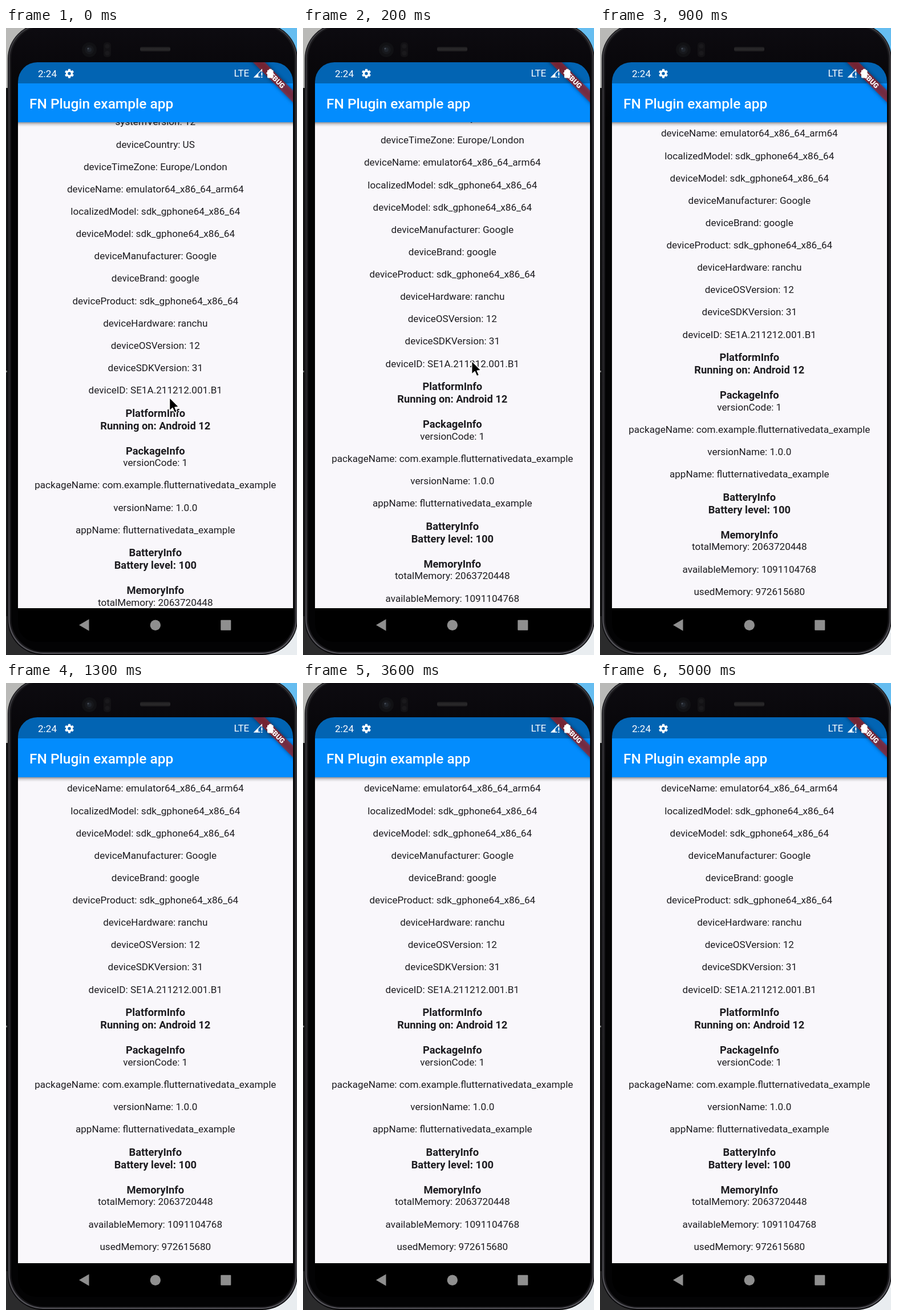
An HTML page with a canvas that plays this animation: 510 px wide and 1098 px high, repeating every 5100 ms.

```html
<!DOCTYPE html>
<html lang="en">
<head>
<meta charset="utf-8">
<title>Plugin example app</title>
<style>
html, body { margin: 0; width: 100%; height: 100%; overflow: hidden; background: #000; }
canvas { display: block; width: 510px; height: 1098px; }
</style>
</head>
<body>
<canvas id="stage"></canvas>
<script>
const W = 510, H = 1098, LOOP = 5100, STEP = 100;
const DP = 1.2232;
const SCREEN = { x: 21, y: 60, r: 503, bar: 97, body: 165, end: 1016 };
const MID = 261.8;
const FONT = 'Roboto, "Noto Sans", sans-serif';

const canvas = document.getElementById('stage');
const ratio = window.devicePixelRatio || 1;
canvas.width = W * ratio;
canvas.height = H * ratio;
const ctx = canvas.getContext('2d');

// Lines starting with '#' are bold; an empty line is a bold-height gap.
const lines = [
  'systemVersion: 12', 'deviceCountry: US', 'deviceTimeZone: Europe/London',
  'deviceName: emulator64_x86_64_arm64', 'localizedModel: sdk_gphone64_x86_64',
  'deviceModel: sdk_gphone64_x86_64', 'deviceManufacturer: Google',
  'deviceBrand: google', 'deviceProduct: sdk_gphone64_x86_64',
  'deviceHardware: ranchu', 'deviceOSVersion: 12', 'deviceSDKVersion: 31',
  'deviceID: SE1A.211212.001.B1',
  '#PlatformInfo', '#Running on: Android 12', '',
  '#PackageInfo', 'versionCode: 1',
  'packageName: com.example.flutternativedata_example',
  'versionName: 1.0.0', 'appName: flutternativedata_example',
  '#BatteryInfo', '#Battery level: 100', '',
  '#MemoryInfo', 'totalMemory: 2063720448', 'availableMemory: 1091104768',
  'usedMemory: 972615680'
];

function layout() {
  const rows = [];
  let top = 0;
  for (const line of lines) {
    const bold = line[0] === '#';
    if (line) rows.push({ text: bold ? line.slice(1) : line, bold, y: (top + (bold ? 14 : 13)) * DP });
    top += bold || !line ? 18 : 32;
  }
  return rows;
}
const rows = layout();
const LIST_TOP = 154.53;

function box(x, y, w, h, r, fill) {
  ctx.beginPath();
  ctx.roundRect(x, y, w, h, r);
  ctx.fillStyle = fill;
  ctx.fill();
}

function disc(x, y, r, fill) {
  ctx.beginPath();
  ctx.arc(x, y, r, 0, Math.PI * 2);
  ctx.fillStyle = fill;
  ctx.fill();
}

function poly(points, fill) {
  ctx.beginPath();
  points.forEach(([x, y]) => ctx.lineTo(x, y));
  ctx.closePath();
  if (fill) {
    ctx.fillStyle = fill;
    ctx.fill();
  }
}

function label(text, x, y, size, weight, color, align = 'left') {
  ctx.font = `${weight} ${size}px ${FONT}`;
  ctx.textAlign = align;
  ctx.fillStyle = color;
  ctx.fillText(text, x, y);
}

function fade(x0, y0, x1, y1, ...colors) {
  const g = ctx.createLinearGradient(x0, y0, x1, y1);
  colors.forEach((c, i) => g.addColorStop(i / (colors.length - 1), c));
  return g;
}

function drawPhone() {
  box(0, 0, W, H, 0, '#161617');
  box(0, 0, 60, 105, 0, '#b9b9b7');
  box(450, 0, 60, 60, 0, '#66bdf0');
  box(0, 1030, 60, 68, 0, '#2b2b2c');
  box(450, 1030, 60, 68, 0, '#e9edf0');

  // Metal rim, then the glass.
  box(3, -8, 508, 1106, 62, '#08080a');
  box(4, -7, 506, 1103, 61, fade(0, 0, 0, H, '#3c3b40', '#2a292d', '#28272a', '#55545a'));
  box(6.5, -5, 501, 1099, 59, '#19181b');
  box(9, -3, 496, 1095, 57, fade(0, 0, 0, 160, '#0d0b10', '#030304'));
  box(0, 600, 2, 3, 0, '#777');

  disc(146, 38, 13, '#111114');
  disc(146, 38, 8, '#17181c');
  disc(146, 38, 4, '#20242b');
  disc(144, 36, 1.5, '#454b55');
  box(171, 25, 13, 26, 5, '#131215');
  disc(177.5, 32, 4, '#1a191c');
  disc(177.5, 44, 4, '#1a191c');
  box(235, 33, 53, 8, 3, fade(0, 33, 0, 41, '#1a191b', '#2b2a2c', '#1b1a1c'));
}

function drawList(scroll) {
  const { x, r, body, end } = SCREEN;
  ctx.save();
  ctx.beginPath();
  ctx.rect(x, body, r - x, end - body);
  ctx.clip();
  box(x, body, r - x, end - body, 0, '#f9f7fb');
  for (const row of rows) {
    const y = LIST_TOP + row.y - scroll;
    if (y < body - 10 || y > end + 20) continue;
    label(row.text, MID, y, (row.bold ? 15 : 14) * DP, row.bold ? 700 : 400, '#1d1c20', 'center');
  }
  box(x, body, r - x, 8, 0, fade(0, body, 0, body + 8, 'rgba(0,0,0,.4)', 'rgba(0,0,0,.12)', 'rgba(0,0,0,0)'));
  ctx.restore();
}

function drawGear(x, y) {
  ctx.save();
  ctx.translate(x, y);
  disc(0, 0, 6, '#fff');
  for (let i = 0; i < 6; i++) {
    ctx.rotate(Math.PI / 3);
    box(-2.1, -8, 4.2, 5, 0.8, '#fff');
  }
  disc(0, 0, 2.7, '#0264b3');
  ctx.restore();
}

function drawBanner() {
  const band = fill => box(-60, 28 * DP, 120, 12 * DP, 0, fill);
  ctx.save();
  ctx.translate(502, SCREEN.y);
  ctx.rotate(Math.PI / 4);
  ctx.filter = 'blur(3px)';
  band('rgba(0,0,0,.5)');
  ctx.filter = 'none';
  band('rgba(183,28,28,.63)');
  label('DEBUG', 0, 34 * DP + 4.4, 10.2 * DP, 900, '#fff', 'center');
  ctx.restore();
}

function drawBars() {
  const { x, y, r, bar, body } = SCREEN;
  ctx.save();
  ctx.beginPath();
  ctx.roundRect(x, y, r - x, body - y, [34, 34, 0, 0]);
  ctx.clip();
  box(x, bar, r - x, body - bar, 0, '#038cfd');
  box(x, y, r - x, bar - y, 0, '#0264b3');
  label('FN Plugin example app', 41, 140.7, 20 * DP, 500, '#fff');
  drawBanner();
  ctx.restore();

  label('2:24', 56, 86, 14 * DP, 400, '#fff');
  drawGear(111, 79.7);
  label('LTE', 399.5, 85, 14 * DP, 400, '#fff');

  ctx.save();
  ctx.translate(-0.7, 0);
  poly([[449, 73], [449, 86], [436, 86]]);
  ctx.strokeStyle = '#fff';
  ctx.lineWidth = 1.4;
  ctx.stroke();
  poly([[443, 79], [443, 86], [436, 86]], '#fff');
  box(446.2, 77, 5, 10.5, 0, '#0264b3');
  box(448, 78, 2, 5.5, 0, '#fff');
  box(448, 85, 2, 2, 0, '#fff');
  ctx.restore();

  box(458, 73.5, 10.5, 14, 1.5, '#fff');
  box(461, 71.8, 4.5, 3, 0.5, '#fff');
}

function drawNav() {
  const { x, r, end } = SCREEN;
  box(x, end, r - x, 59, [0, 0, 32, 32], '#000');
  const gray = '#8f8f8f';
  poly([[128, 1045.5], [145.5, 1035.2], [145.5, 1055.8]], gray);
  disc(261.8, 1045.7, 9.2, gray);
  box(376.3, 1036.7, 18, 18, 1, gray);
}

function drawCursor(x, y) {
  ctx.save();
  ctx.translate(x, y);
  poly([[0, 0], [0, 23.5], [5.4, 18.6], [9, 26.8], [13, 25], [9.5, 17.2], [16.6, 16.6]], '#000');
  ctx.lineJoin = 'round';
  ctx.lineWidth = 1.5;
  ctx.strokeStyle = '#fff';
  ctx.stroke();
  ctx.restore();
}

// Upward swipe: steady for 400 ms, then easing to rest.
function swipe(t) {
  if (t <= 400) return t * 0.32;
  const k = Math.min((t - 400) / 300, 1);
  return 128 + 46 * (1 - (1 - k) ** 2);
}

function render(t) {
  const drag = swipe(t);
  const scroll = Math.min(Math.max(drag - 17.5, 0), 97.5);
  ctx.setTransform(ratio, 0, 0, ratio, 0, 0);
  drawPhone();
  drawList(scroll);
  drawBars();
  drawNav();
  if (t < 900) drawCursor(286.5 + drag * 0.143, 647 - drag);
}

function tick(now) {
  render(Math.floor((now % LOOP) / STEP) * STEP);
  requestAnimationFrame(tick);
}
render(0);
requestAnimationFrame(tick);
</script>
</body>
</html>
```
